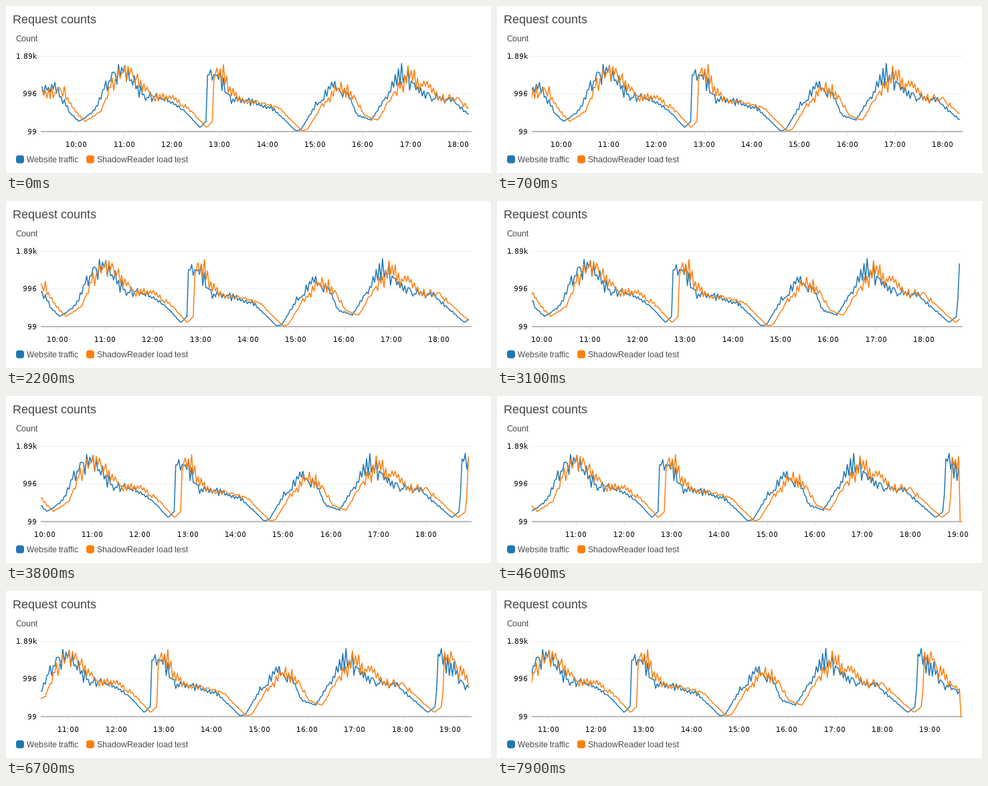
A matplotlib script for the animation above (8000 ms loop, 725 by 250 pixels).

```python
import matplotlib.pyplot as plt
import numpy as np
from matplotlib.animation import FuncAnimation
from matplotlib.patches import FancyBboxPatch, Rectangle

W, H = 725, 250
FRAMES, INTERVAL = 80, 100
LEFT, RIGHT, TOP, BASE = 53, 695, 74.5, 187.5
MINUTE = (RIGHT - LEFT) / 540      # nine hours across the plot
BUCKET = 2 * MINUTE                # one sample every two minutes
START = 9 * 60 + 16                # left edge at the start of the loop
LAG = 8 * MINUTE                   # the load test replays traffic this late
PT = 0.72                          # points per pixel at 100 dpi
BLUE, ORANGE, GREY = "#1f77b4", "#ff7f0e", "#444444"

# Turning points of the traffic: x at the start of the loop, height above base.
TREND = [
    (45, 55), (74, 64), (97, 27), (109, 15), (131, 30), (145, 60), (160, 88),
    (178, 84), (208, 53), (240, 50), (266, 32), (290, 6), (299, 15),
    (302, 92), (318, 82), (337, 48), (378, 43), (400, 34), (433, 1),
    (441, 3), (463, 40), (490, 66), (510, 55), (526, 24), (546, 17),
    (562, 45), (592, 86), (615, 68), (640, 49), (665, 49), (687, 30),
    (714, 6), (726, 16), (729, 92), (756, 66), (768, 46), (792, 37),
]

plt.rcParams.update({"text.hinting": "default", "text.hinting_factor": 1})


def series(lag, seed):
    """The trend, delayed, with a zigzag that grows with the level."""
    k = np.arange(315)
    x = LEFT + 1 + k * BUCKET
    level = np.interp(x - lag, *np.transpose(TREND))
    swing = np.random.default_rng(seed).uniform(-0.3, 1, k.size)
    noise = (-1.0) ** k * swing * np.minimum(0.003 * level ** 2, 17)
    return x, np.clip(level + noise, 0, 113)


def shift_at(n):
    """Minutes scrolled since the start of the loop."""
    return round(float(np.interp(n, [0, 14, 31, 46, 56, 67, 79],
                                 [0, 16, 32, 49, 58, 70, 84])))


fig = plt.figure(figsize=(W / 100, H / 100), dpi=100, facecolor="white")
ax = fig.add_axes([0, 0, 1, 1])
ax.set(xlim=(0, W), ylim=(H, 0))
ax.axis("off")


def label(x, y, text, size=11, color="black", font="DejaVu Sans", ha="left"):
    return ax.text(x, y, text, fontsize=size * PT, color=color, family=font,
                   ha=ha, va="baseline")


def rule(xs, ys, color, width=1, **kw):
    return ax.plot(xs, ys, color=color, lw=width * PT, **kw)[0]


label(10, 26, "Request counts", 18, GREY, "Liberation Sans")
label(14, 53, "Count", 12, GREY, "Liberation Sans")

for y, text in ((TOP, "1.89k"), (131, "996"), (BASE, "99")):
    label(46, round(y + 4.4), text, ha="right")
for y in (TOP, 130.5):
    rule([LEFT - 3, RIGHT], [y, y], "#eeeeee", zorder=1)
rule([LEFT, RIGHT], [188, 188], "#bbbbbb", 2, zorder=1)

for x, color, text in ((15, BLUE, "Website traffic"),
                       (120, ORANGE, "ShadowReader load test")):
    ax.add_patch(FancyBboxPatch((x, 223.5), 12, 12, fc=color, ec="none",
                                boxstyle="round,pad=0,rounding_size=4"))
    label(x + 16, 234, text, 12, GREY, "Liberation Sans")

ticks = [(h, rule([0, 0], [189, 194], "#e4e4e4"),
          label(0, 211, f"{h}:00", ha="center")) for h in range(10, 20)]

plot_area = Rectangle((LEFT - 0.7, 60), RIGHT - LEFT + 0.7, 130,
                      transform=ax.transData)
curves = []
# Now and then the newest sample is still empty: every `period` frames.
for color, lag, seed, period, phase in ((BLUE, 0, 4, 20, 14),
                                        (ORANGE, LAG, 9, 33, 13)):
    line = rule([], [], color, 1.5, zorder=3, solid_joinstyle="round")
    line.set_clip_path(plot_area)
    curves.append((line, *series(lag, seed), period, phase))


def draw(n):
    shift = shift_at(n)
    for hour, tick, text in ticks:
        x = LEFT + (hour * 60 - START - shift) * MINUTE
        shown = LEFT <= x <= RIGHT
        tick.set_xdata([x, x])
        text.set_x(x)
        tick.set_visible(shown)
        text.set_visible(shown)
    for line, x, level, period, phase in curves:
        empty = n % period == phase
        x = x - shift * MINUTE
        keep = x < (694 if empty else 692)
        h = level[keep]
        if empty:
            h[-1] = 0
        line.set_data(x[keep], 188 - h)
    return []


anim = FuncAnimation(fig, draw, frames=FRAMES, interval=INTERVAL,
                     repeat=True, repeat_delay=0, blit=False)
plt.show()
```
